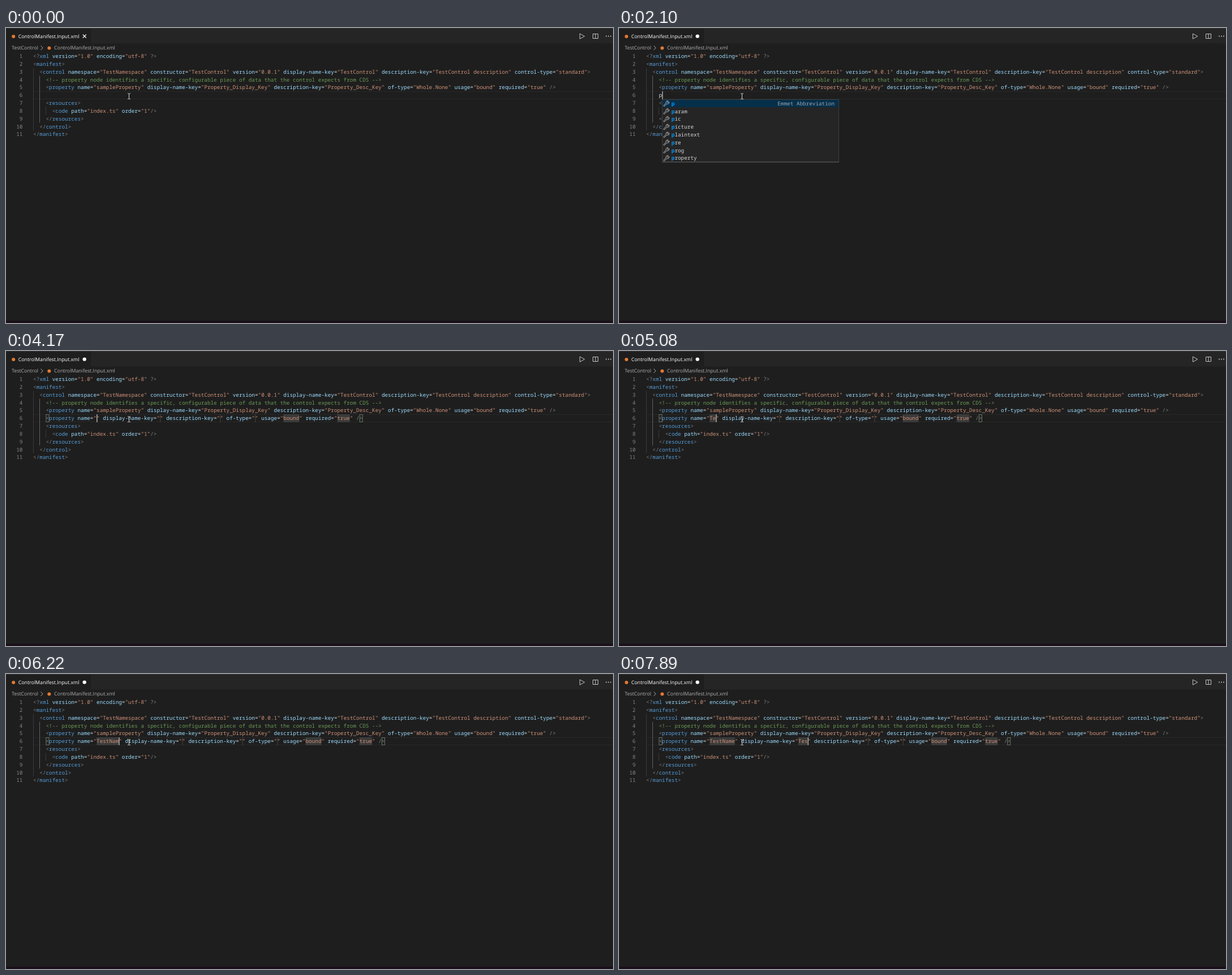
Animation of 1073x522 px, one loop 8000 ms. Source, as an HTML page:

```html
<!DOCTYPE html>
<html lang="en">
<head>
<meta charset="utf-8">
<title>Editor snippet</title>
<style>
html, body { margin: 0; width: 100%; height: 100%; overflow: hidden; background: #1e1e1e; }
svg { display: block; width: 1073px; height: 522px; }
text { text-rendering: geometricPrecision; white-space: pre; }
.mono { font: 500 9.33px "Noto Sans Mono", "DejaVu Sans Mono", monospace; }
.ui { font: 8.83px "Open Sans", "Noto Sans", sans-serif; }
.hit { font-weight: 700; }
</style>
</head>
<body>
<svg viewBox="0 0 1073 522">
  <rect width="1073" height="522" fill="#1e1e1e"/>
  <rect width="1073" height="27.5" fill="#252526"/>
  <rect width="150" height="27.5" fill="#1e1e1e"/>
  <rect width="1073" height="1" fill="#333"/>
  <rect y="518" width="1073" height="4" fill="#1a1019"/>

  <g class="ui">
    <circle cx="13.2" cy="15" r="3" fill="#e37933"/>
    <text x="21.7" y="18" fill="#fff">ControlManifest.Input.xml</text>
    <text x="10" y="38.4" fill="#b0b0b0">TestControl</text>
    <path d="M61.5 31.5l3.6 3.7-3.6 3.7" fill="none" stroke="#b0b0b0"/>
    <circle cx="76.3" cy="35.4" r="3" fill="#e37933"/>
    <text x="85" y="38.4" fill="#b0b0b0">ControlManifest.Input.xml</text>
  </g>
  <path id="close" d="M135.8 11.5l6 6m0-6l-6 6" stroke="#fff" stroke-width="1.1"/>
  <circle id="dirty" cx="138.7" cy="14.6" r="3.2" fill="#fff"/>

  <g fill="none" stroke="#c5c5c5">
    <path d="M1014.4 10v9.2l8.4-4.6z"/>
    <path d="M1037.5 10.5h9v8h-9zM1042 10.5v8"/>
  </g>
  <g fill="#c5c5c5">
    <circle cx="1061" cy="14.6" r="1"/><circle cx="1065" cy="14.6" r="1"/><circle cx="1069" cy="14.6" r="1"/>
  </g>

  <path d="M48 112.5H1073M48 125.5H1073" stroke="#282828"/>
  <g class="mono" id="code"></g>
  <g class="mono" id="edit"></g>
  <g class="mono" id="popup"></g>
  <path d="M215 116h1.7l.8.6.8-.6h1.7M217.5 116.6v8.4M215 125.6h1.7l.8-.6.8.6h1.7" fill="none" stroke="#e4e4e4" stroke-width=".95"/>
</svg>
<script>
const CW = 5.598, LH = 13.82, LOOP = 8000, EDIT = 6;
const $ = id => document.getElementById(id);
const colX = col => 48.1 + col * CW;
const rowY = row => 43 + (row - 1) * LH;
const esc = s => s.replace(/&/g, '&amp;').replace(/</g, '&lt;');
const rect = (x, y, w, h, attrs) => `<rect x="${x}" y="${y}" width="${w}" height="${h}" ${attrs}/>`;
const label = (x, y, fill, s, attrs = '') => `<text x="${x}" y="${y}" fill="${fill}" ${attrs}>${esc(s)}</text>`;

const C = { punct: '#808080', tag: '#569cd6', attr: '#9cdcfe', str: '#ce9178', note: '#6a9955', plain: '#d4d4d4' };

const LINES = [
  '<?xml version="1.0" encoding="utf-8" ?>',
  '<manifest>',
  '  <control namespace="TestNamespace" constructor="TestControl" version="0.0.1" display-name-key="TestControl" description-key="TestControl description" control-type="standard">',
  '    <!-- property node identifies a specific, configurable piece of data that the control expects from CDS -->',
  '    <property name="sampleProperty" display-name-key="Property_Display_Key" description-key="Property_Desc_Key" of-type="Whole.None" usage="bound" required="true" />',
  '',
  '    <resources>',
  '      <code path="index.ts" order="1"/>',
  '    </resources>',
  '  </control>',
  '</manifest>'
];

// Syntax-coloured line of code
function codeLine(s, row) {
  const y = rowY(row) + 10.2;
  const put = (col, part, fill) => label(colX(col), y, fill, part);
  const note = s.indexOf('<!--');
  if (note >= 0) return put(note, s.slice(note), C.note);
  let out = '';
  for (const m of s.matchAll(/(<[\/?]?|[\/?]?>)(\w+)?|([\w-]+)(?==)|("[^"]*")|(=|\w+)/g)) {
    const [, punct, tag, attr, str, plain] = m;
    if (punct) out += put(m.index, punct, C.punct);
    if (tag) out += put(m.index + punct.length, tag, C.tag);
    if (attr) out += put(m.index, attr, C.attr);
    if (str) out += put(m.index, str, C.str);
    if (plain) out += put(m.index, plain, C.plain);
  }
  return out;
}

const guide = (col, from, to, color) =>
  rect(Math.floor(colX(col)), rowY(from), 1, (to - from + 1) * LH, `fill="${color}"`);

$('code').innerHTML =
  guide(0, 3, 10, '#3a3a3a') + guide(2, 4, 9, '#606060') + guide(4, 8, 8, '#3a3a3a') +
  LINES.map((s, i) =>
    label(29.4, rowY(i + 1) + 10.2, '#858585', String(i + 1), 'text-anchor="end"') + codeLine(s, i + 1)
  ).join('');

const ITEMS = ['p', 'param', 'pic', 'picture', 'plaintext', 'pre', 'prog', 'property'];

const WRENCH = 'M3.2 10.9 7.3 6.9C8.6 7.4 10.4 7 11.1 5.6 11.5 4.8 11.5 4 11.2 3.2L9.3 5 7.9 3.7 9.7 1.8C8.2 1.3 6.5 2 6 3.5 5.8 4.2 5.8 4.8 6 5.5L1.9 9.6C1.2 10.5 2.3 11.6 3.2 10.9Z';

// Suggestion list under the caret, filtered by the typed prefix
function popup(prefix, col) {
  if (!prefix) return '';
  const items = ITEMS.filter(s => s.startsWith(prefix));
  const x = Math.round(colX(col)), y = 126, w = 313, h = items.length * LH + 1.2;
  let out = rect(x, y, w, h, 'fill="#252526"') + rect(x + 1, y + .8, w - 2, LH - .4, 'fill="#062f4a"');
  items.forEach((s, i) => {
    const top = y + .5 + i * LH, base = top + 10.2, tx = x + 16.8;
    out += `<path d="${WRENCH}" transform="translate(${x + 1.2} ${top + .8})" fill="none" stroke="#c5c5c5" stroke-width=".95"/>`;
    out += label(tx, base, '#0097fb', prefix, 'class="hit"');
    out += label(tx + prefix.length * CW, base, C.plain, s.slice(prefix.length));
    if (s === 'p') out += label(x + 305, base, '#9ba6ae', 'Emmet Abbreviation', 'text-anchor="end"');
  });
  return out + rect(x + .5, y + .5, w - 1, h - 1, 'fill="none" stroke="#454545" stroke-width=".8"') +
    rect(x, y + h - 1.2, w, 1.4, 'fill="#505050"');
}

const snippet = (name, disp) =>
  `<property name="${name}" display-name-key="${disp}" description-key="" of-type="" usage="bound" required="true" />`;

// Each step: start, caret shown, then typed word + list prefix, or field values
const word = (t, on, typed = '', list = '') => ({ t, on, typed, list });
const tag = (t, on, name = '', disp = null) => ({ t, on, name, disp });
const STEPS = [
  word(0, 0), word(340, 1), word(880, 0), word(1340, 1),
  word(1880, 1, 'p'), word(1960, 1, 'p'), word(2100, 1, 'p', 'p'),
  word(2180, 1, 'pr', 'p'), word(2250, 1, 'pr', 'pr'), word(2320, 1, 'pro', 'pro'),
  word(2400, 1, 'prop', 'prop'), word(2860, 0, 'prop', 'prop'),
  tag(3240, 1), tag(3710, 0), tag(4170, 1), tag(4710, 0),
  tag(4850, 1, 'T'), tag(5080, 1, 'Te'), tag(5220, 1, 'Tes'), tag(5450, 1, 'Test'),
  tag(5940, 1, 'TestN'), tag(5990, 1, 'TestNa'), tag(6220, 1, 'TestNam'), tag(6300, 1, 'TestName'),
  tag(6670, 1, 'TestName', ''), tag(7130, 0, 'TestName', ''),
  tag(7520, 1, 'TestName', 'T'), tag(7750, 1, 'TestName', 'Te'), tag(7890, 1, 'TestName', 'Tes')
];

function draw(step) {
  const top = rowY(EDIT);
  let text, caret, back = '';
  if ('typed' in step) {
    text = '    ' + step.typed;
    caret = text.length;
  } else {
    text = '    ' + snippet(step.name, step.disp || '');
    const fields = [...text.matchAll(/"([^"]*)"/g)].map(m => ({ col: m.index + 1, len: m[1].length }));
    for (const f of fields)
      back += rect(colX(f.col), top, Math.max(f.len * CW, 1.45), LH, 'fill="#7c7c7c" fill-opacity=".3"');
    for (const col of [4, text.length - 1])
      back += rect(colX(col) + .4, top + .4, CW - .4, LH - .8, 'fill="#006400" fill-opacity=".1" stroke="#888" stroke-width=".75"');
    const active = fields[step.disp === null ? 0 : 1];
    caret = active.col + active.len;
  }
  const bar = step.on ? rect(colX(caret), top, 1.45, LH, 'fill="#aeafad"') : '';
  $('edit').innerHTML = back + codeLine(text, EDIT) + bar;
  // The list opens at the caret position of its own prefix
  $('popup').innerHTML = step.list ? popup(step.list, 4 + step.list.length) : '';
  const changed = step.t >= 1960;
  $('close').style.display = changed ? 'none' : '';
  $('dirty').style.display = changed ? '' : 'none';
}

const start = performance.now();
let shown = null;
function tick() {
  const t = (performance.now() - start) % LOOP;
  const step = STEPS.findLast(s => s.t <= t);
  if (step !== shown) draw(shown = step);
  requestAnimationFrame(tick);
}
tick();
</script>
</body>
</html>
```
